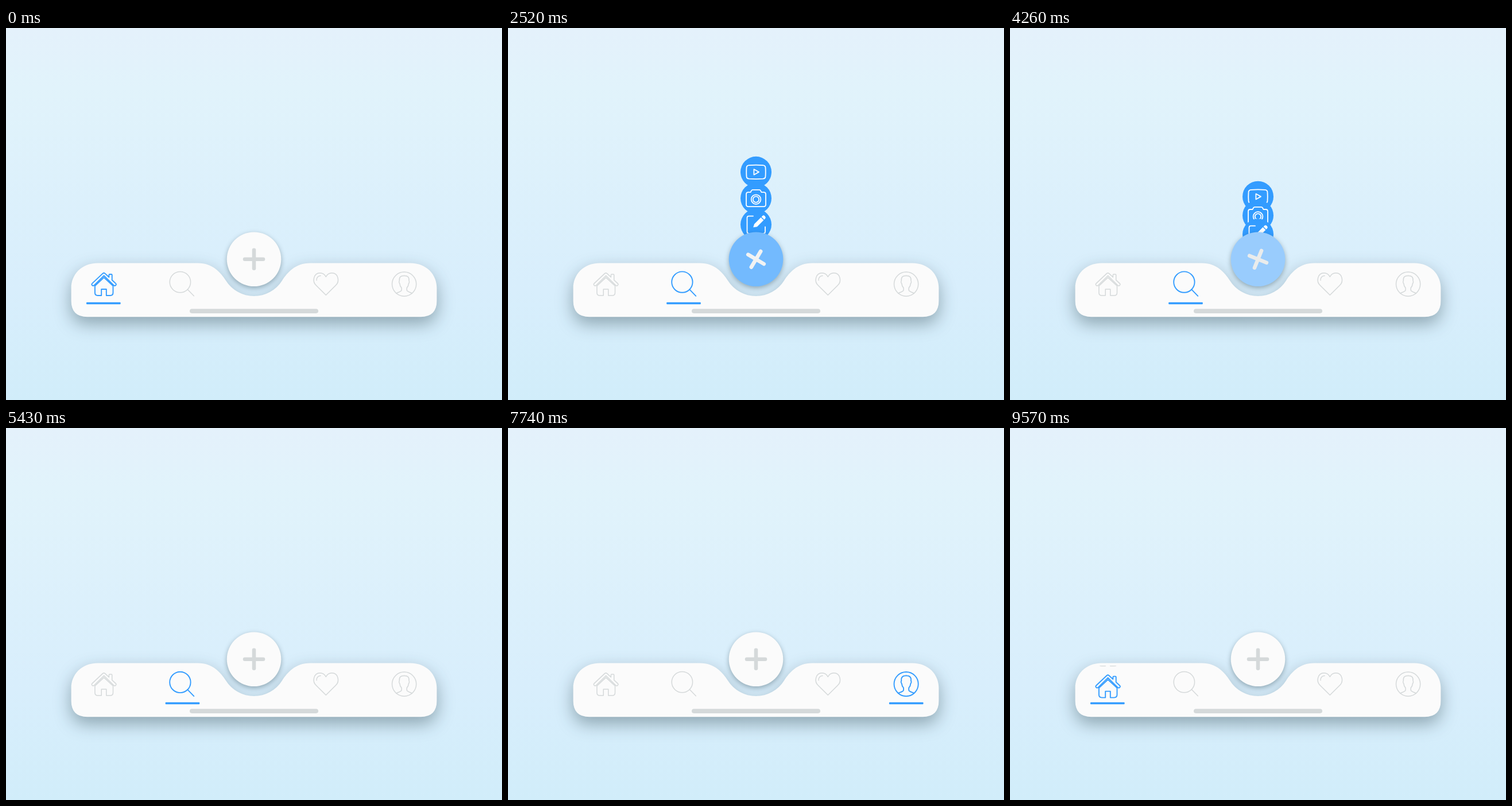
An HTML page that plays this animation: 864 by 648 pixels, repeating every 9600 ms.

```html
<!DOCTYPE html>
<html lang="en">
<head>
<meta charset="utf-8">
<title>Tab bar</title>
<style>
  html, body { margin: 0; width: 100%; height: 100%; overflow: hidden; }
  body { background: linear-gradient(#e4f1fb, #e1f3fb 16%, #d8eefc 70%, #d1edfa); }
  svg { display: block; width: 864px; height: 648px; fill: none; stroke-linecap: round; stroke-linejoin: round; }
  .bar { fill: #fbfbfb; filter: drop-shadow(0 12px 15px rgba(10, 35, 45, .36)); }
  .button { filter: drop-shadow(0 3px 4px rgba(10, 35, 45, .34)); }
  .off { stroke: #d5d9da; stroke-width: 1.5; }
  .on { stroke: #339cff; stroke-width: 1.9; }
  .action { stroke: #fff; stroke-width: 1.8; }
  .action .disc { fill: #339cff; stroke: none; }
  .solid { fill: #fff; stroke: none; }
</style>
</head>
<body>
<svg viewBox="0 0 864 648">
  <defs>
    <clipPath id="slot"><rect x="113" y="414" width="638" height="60"/></clipPath>
    <g id="tab0">
      <path d="M150.2 448.3q-1.8-1.8 0-3.4L168.5 427.6Q170.5 425.8 172.5 427.6L179.4 434V430.3Q179.4 429 180.6 429H183.5Q184.7 429 184.7 430.3V439L191 444.9q1.8 1.6 0 3.4q-1.7 1.4-3.4 0L170.6 431.5 153.6 448.3q-1.7 1.4-3.4 0z"/>
      <path d="M154.9 449.3V461Q154.9 466 159.9 466H166.2V455H174.8V466H181.5Q186.5 466 186.5 461V449.3L170.6 434.6z"/>
    </g>
    <g id="tab1">
      <circle cx="303.4" cy="442.6" r="18.2"/>
      <path d="M316.4 455.6L327.3 466.8"/>
    </g>
    <g id="tab2">
      <path d="M557.3 465.2L540.2 448.3C533 441.5 535.5 427 547 426.8C552 426.8 555.5 430 557.3 433.5C559.1 430 562.7 426.8 567.6 426.8C579.1 427 581.6 441.5 574.4 448.3z"/>
      <path d="M541 439.5C540.8 434.5 543.8 431.7 548 431.6"/>
    </g>
    <path id="half" d="M-13.8 15.8C-9.6 14-4.8 13-4.6 10.5V6.5C-7.1 4-7.6 1.5-7.8-1C-9.3-2.5-9.1-5-8.3-6C-9.1-12-6.1-14.7 0-14.7"/>
    <g id="tab3" transform="translate(693.6 446.1)">
      <circle r="21.1"/>
      <use href="#half"/>
      <use href="#half" transform="scale(-1 1)"/>
    </g>
  </defs>

  <path class="bar" d="M160 409.6H334C360 409.6 374 426 383 440A58 58 0 0 0 481 440C490 426 504 409.6 530 409.6H704C733 409.6 750.4 430 750.4 453V475Q750.4 503.2 722.4 503.2H141.6Q113.6 503.2 113.6 475V453C113.6 430 131 409.6 160 409.6z"/>
  <g id="tabs" clip-path="url(#slot)"></g>
  <rect id="line" y="477.8" width="59.6" height="3.5" rx="1" fill="#339cff"/>
  <rect x="320" y="489.2" width="224" height="7.7" rx="3.85" fill="#d5d9da"/>

  <g class="action">
    <circle class="disc" r="27"/>
    <path d="M-12-11.8Q0-12.6 12-11.8Q16.4-11.4 16.5-7.5Q17 0 16.5 7.5Q16.4 11.4 12 11.8Q0 12.6-12 11.8Q-16.4 11.4-16.5 7.5Q-17 0-16.5-7.5Q-16.4-11.4-12-11.8z"/>
    <path d="M-3.6-4.8L5 0-3.6 4.8z"/>
  </g>
  <g class="action">
    <circle class="disc" r="27"/>
    <path d="M-13.5-10.5h4l1.7-3q.8-1.2 2-1.2h11.6q1.2 0 2 1.2l1.7 3h4q3.5 0 3.5 3.5v18q0 3.5-3.5 3.5h-27q-3.5 0-3.5-3.5v-18q0-3.5 3.5-3.5z"/>
    <circle cy="2" r="8.3"/>
    <circle cy="2" r="5.2"/>
  </g>
  <g class="action">
    <circle class="disc" r="27"/>
    <path d="M-5-14.7H-12.5Q-15.5-14.7-15.5-11.7V12.5Q-15.5 15.5-12.5 15.5H13Q16 15.5 16 12.5V4"/>
    <path class="solid" d="M-4.8 5L-3-.8 8.5-12.3 13.3-7.5 1.8 4zM9.6-13.4L11.6-15.4Q13.2-16.6 14.8-15.2L16.1-13.9Q17.4-12.3 16.2-10.6L14.4-8.6z"/>
  </g>

  <circle id="button" class="button" cx="432" cy="402.8" r="47.3"/>
  <path id="plus" d="M-16 0H16M0-16V16" stroke-width="6.6"/>
</svg>
<script>
const LOOP = 9600, SLIDE = 540, STEP = 55;
const OPEN = 2272, CLOSE = 4075, MENU = 365;
const centers = [169.8, 306, 557.4, 693.7];
const reach = [223, 156, 89];
// start, from, to, delay of the newly selected icon
const moves = [[905, 0, 1, 0], [5405, 1, 2, 115], [7205, 2, 3, 0], [9005, 3, 0, 115]];

const $ = id => document.getElementById(id);
const clamp = x => Math.min(1, Math.max(0, x));
const ease = x => (1 - Math.cos(Math.PI * clamp(x))) / 2;
const mix = (a, b, k) => a + (b - a) * k;
const blend = (a, b, k) => `rgb(${a.map((v, i) => Math.round(mix(v, b[i], k)))})`;

$('tabs').innerHTML = centers.map((c, i) =>
  `<g><use href="#tab${i}" class="off"/><use href="#tab${i}" y="${STEP}" class="on"/></g>`).join('');
const tabs = [...$('tabs').children];
const actions = document.querySelectorAll('.action');

function draw(t) {
  const active = [1, 0, 0, 0];
  let x = centers[0];
  for (const [start, from, to, delay] of moves) {
    if (t < start) break;
    const k = ease((t - start) / SLIDE);
    x = mix(centers[from], centers[to], k);
    active[from] = 1 - k;
    active[to] = ease((t - start - delay) / SLIDE);
  }
  tabs.forEach((g, i) => g.setAttribute('transform', `translate(0 ${-STEP * active[i]})`));
  $('line').setAttribute('x', x - 29.8);

  const open = clamp((t - OPEN) / MENU) - clamp((t - CLOSE) / MENU);
  actions.forEach((g, i) => {
    g.setAttribute('transform', `translate(432 ${403 - reach[i] * open})`);
    g.style.visibility = open > 0 ? 'visible' : 'hidden';
  });
  $('button').style.fill = blend([251, 251, 251], [51, 156, 255], open);
  $('plus').style.stroke = blend([213, 217, 218], [255, 255, 255], open);
  $('plus').setAttribute('transform', `translate(432 402.8) rotate(${45 * open})`);
}

const begin = performance.now();
function tick() {
  draw((performance.now() - begin) % LOOP);
  requestAnimationFrame(tick);
}
tick();
</script>
</body>
</html>
```
